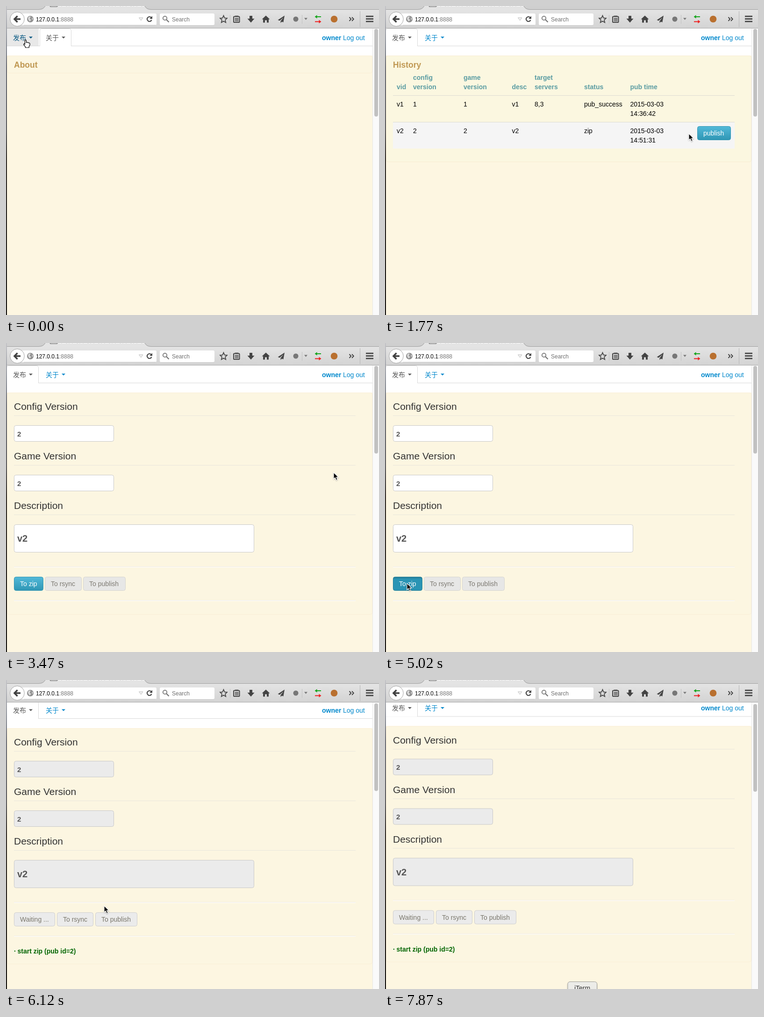
An HTML page for the animation above (8000 ms loop, 798 by 661 pixels).

```html
<!DOCTYPE html>
<html lang="en">
<head>
<meta charset="utf-8">
<title>Publish console</title>
<style>
html, body { margin: 0; width: 100%; height: 100%; overflow: hidden; background: #fff; }
svg { display: block; width: 798px; height: 661px; }
text { font: 14px "Liberation Sans", "Noto Sans CJK SC", Arial, sans-serif; white-space: pre; }
.b { font-weight: bold; }
.h3 { font-size: 21px; }
.h4 { font-size: 17.5px; font-weight: bold; }
.s { font-size: 12px; }
</style>
</head>
<body>
<svg viewBox="0 0 798 661">
  <defs>
    <linearGradient id="bar" x2="0" y2="1"><stop stop-color="#e4e4e4"/><stop offset="1" stop-color="#d3d3d3"/></linearGradient>
    <linearGradient id="info" x2="0" y2="1"><stop stop-color="#52b9d9"/><stop offset="1" stop-color="#2f96b4"/></linearGradient>
    <linearGradient id="pick" x2="0" y2="1"><stop stop-color="#0088cc"/><stop offset="1" stop-color="#0077b3"/></linearGradient>
    <linearGradient id="desk" x2="0" y2="1">
      <stop stop-color="#c4c4c8"/><stop offset=".12" stop-color="#8e929a"/><stop offset=".2" stop-color="#666a74"/>
      <stop offset=".4" stop-color="#55565a"/><stop offset=".5" stop-color="#2a2622"/><stop offset="1" stop-color="#0c0a08"/>
    </linearGradient>
    <filter id="drop" x="-10%" y="-10%" width="120%" height="140%"><feDropShadow dx="0" dy="4" stdDeviation="3.5" flood-opacity=".25"/></filter>
    <filter id="soft" x="-50%" y="-50%" width="200%" height="200%"><feDropShadow dx="0" dy="1" stdDeviation="1" flood-opacity=".35"/></filter>
    <clipPath id="view"><rect x="2" y="48" width="783" height="613"/></clipPath>
  </defs>

  <rect width="798" height="661" fill="#fff"/>
  <g clip-path="url(#view)"><g id="page"></g></g>

  <rect x="784" y="48" width="14" height="613" fill="#fafafa"/>
  <path d="M784.5 48V661" stroke="#e7e7e7"/>
  <rect id="thumb" x="788" y="49" width="8" height="187.5" rx="4" fill="#c1c1c1"/>

  <g id="chrome">
    <rect width="798" height="9" fill="#cfcfcf"/>
    <path d="M74 8Q81 7 84 0H297Q300 7 307 8Z" fill="#e4e4e4"/>
    <path d="M0 7.5H70Q80 7 84 0M297 0Q300 7 310 7.5H798" fill="none" stroke="#a0a0a0"/>
    <path d="M94.5 0V1.5H109.5V0" fill="#fff" stroke="#555"/>
    <path d="M113 .5H297" stroke="#fff" stroke-dasharray="5 2 8 3 3 2"/>
    <rect y="8" width="798" height="40" fill="url(#bar)"/>
    <path d="M0 47.5H798" stroke="#a9a9a9"/>
    <rect x="30" y="16" width="292" height="25" rx="3" fill="#fff"/>
    <path d="M38 41H320M331 41H445" stroke="#bbb" stroke-width=".8"/>
    <rect x="329" y="16" width="117" height="25" rx="3" fill="#fff"/>
    <circle cx="24" cy="28" r="15.3" fill="#fff" stroke="#a2a2a2"/>
    <path d="M31 28H19M24.5 21.5L18 28L24.5 34.5" fill="none" stroke="#404040" stroke-width="3.4"/>
    <circle cx="52" cy="28" r="7" fill="#8d8d8d"/>
    <path d="M47 25Q50 21 53 23L51 27L54 30L51 33Q47 31 47 25M55 24L58 27L56 31" fill="#d8d8d8"/>
    <text class="s" x="64" y="32.5">127.0.0.1<tspan x="114" fill="#777">:8888</tspan></text>
    <path d="M284.5 25H293L288.8 31Z" fill="#f4f4f4" stroke="#bdbdbd"/>
    <path d="M311.5 30A5 5 0 1 1 310.5 24.5" fill="none" stroke="#444" stroke-width="2.2"/>
    <path d="M313 21.5V27.5H307Z" fill="#444"/>
    <circle cx="340" cy="26" r="4.2" fill="none" stroke="#777" stroke-width="1.8"/>
    <path d="M343 29L348.5 34.5" stroke="#777" stroke-width="2.4"/>
    <text class="s" x="355" y="32.5" fill="#707070">Search</text>
    <path d="M465.5 20.5L467.7 25.6L473 26.1L469 29.8L470.2 35.2L465.5 32.4L460.8 35.2L462 29.8L458 26.1L463.3 25.6Z" fill="none" stroke="#444" stroke-width="1.7"/>
    <path d="M479.5 19V38M633.5 19V38" stroke="#c2c2c2"/>
    <path d="M757.5 11V45" stroke="#b5b5b5"/>
    <rect x="487" y="22.5" width="12.5" height="12.5" rx="1.5" fill="none" stroke="#444" stroke-width="2"/>
    <path d="M490 21.5H497M489.5 26.5H497.5M489.5 29H497.5M489.5 31.7H497.5" stroke="#444" stroke-width="1.6"/>
    <path d="M521 21H527V27H531.5L524 35.5L516.5 27H521Z" fill="#444"/>
    <path d="M556 20.5L564.5 28.5H562V35.5H558V30.5H554V35.5H550V28.5H547.5Z" fill="#444"/>
    <path d="M596 20.5L581.5 30L585.5 31.5L593.5 24.5L587.5 32.3V36.5L590 33.5L593.3 35Z" fill="#444"/>
    <circle cx="620" cy="28" r="5.5" fill="#777"/>
    <path d="M638 25.5H645L641.5 29.8Z" fill="#777"/>
    <path d="M660.5 23L665.5 19.3V22H674V24H665.5V26.7Z" fill="#15a51c"/>
    <path d="M674.5 33.5L669.5 29.8V32.5H661V34.5H669.5V37.2Z" fill="#ee2020"/>
    <circle cx="702" cy="28" r="7.3" fill="#b9702f"/>
    <path d="M734.5 24L738.3 28L734.5 32M740 24L743.8 28L740 32" fill="none" stroke="#444" stroke-width="1.9"/>
    <path d="M770 22.2H786M770 27.7H786M770 33.2H786" stroke="#444" stroke-width="2.7"/>
  </g>
  <rect width="2" height="661" fill="url(#desk)"/>

  <g id="label">
    <rect x="-31" y="645.5" width="62.5" height="30" rx="5" fill="#ecece8" stroke="#a0a09c" filter="url(#soft)"/>
    <text y="663.5" text-anchor="middle" fill="#333"></text>
  </g>
  <g id="cursor">
    <path id="arrow" d="M0 0V14L3.2 11L5.6 16.4L8.1 15.3L5.8 10.1H10.2Z" stroke="#fff" stroke-width="1.1" filter="url(#soft)"/>
    <path id="hand" d="M-1.6 10V1.5Q-.2-.7 1.3 1.5V6Q2.8 4.8 4 6.3Q5.6 5.5 6.6 7Q8.6 6.4 9 8.4V11.5L7.3 14.5V17H-.6V15.2L-4 11Q-4.8 8.6-2.9 8.8Z" fill="#fff" stroke="#000" stroke-width="1.2"/>
  </g>
</svg>
<script>
const LOOP = 8000;
const $ = id => document.getElementById(id);

// start, end, number of steps, target position
const moves = [
  [260, 860, 9, 46, 106],
  [1480, 1770, 4, 650, 273],
  [1866, 2250, 5, 701, 277],
  [3550, 4130, 8, 165, 278],
  [4190, 4660, 7, 47, 514],
  [5205, 5490, 4, 210, 483]
];
const hands = [[0, 50], [2400, 2450], [4580, 4660]];
const scrolls = [[0, 0], [6030, 1], [6120, 3], [6240, 6], [6350, 7.5]];
const labels = [
  [7130, 88, 'Tasks'], [7330, 33, 'Files'], [7510, 88, 'Tasks'], [7600, 150, 'Notes'],
  [7690, 235, 'Forms'], [7780, 330, 'Tools'], [7870, 422, 'iTerm']
];

const last = (list, t) => list.filter(e => e[0] <= t).pop();
const within = (p, x, y, w, h) => p[0] >= x && p[0] < x + w && p[1] >= y && p[1] < y + h;

function pointer(t) {
  let p = [42, 72];
  for (const [t0, t1, n, x, y] of moves) {
    if (t < t0) break;
    const k = Math.min(n, Math.floor((t - t0) / (t1 - t0) * (n - 1) + 1.001)) / n;
    p = [p[0] + (x - p[0]) * k, p[1] + (y - p[1]) * k];
  }
  return p;
}

const text = (x, y, s, fill = '#000', cls = '') =>
  `<text x="${x}" y="${y}" fill="${fill}" class="${cls}">${s}</text>`;
const rect = (x, y, w, h, fill, extra = '') =>
  `<rect x="${x}" y="${y}" width="${w}" height="${h}" fill="${fill}" ${extra}/>`;
const frame = (x, y, w, h, fill, line, r = 4) =>
  rect(x + .5, y + .5, w - 1, h - 1, fill, `rx="${r}" stroke="${line}"`);
const rule = (y, color) => rect(17, y, 731, 1, color);
const caret = (x, color) => `<path d="M${x - 4} 65.5h8l-4 4z" fill="${color}"/>`;

function button(x, y, w, s, look) {
  const [fill, line, ink] = {
    info: ['url(#info)', '#3496b3', '#fff'],
    hover: ['#2f96b4', '#2a86a1', '#fff'],
    down: ['#2a94b4', '#237c96', '#fff'],
    off: ['#e7e7e6', '#d6d5d0', '#7d7a72'],
    wait: ['#ebebeb', '#cfcfcf', '#7a776c']
  }[look];
  const shade = look === 'down' ? rect(x + 1, y + 1, w - 2, 3, '#000', 'opacity=".1"') : '';
  return frame(x, y, w, 30, fill, line) + shade + text(x + 13, y + 20, s, ink);
}

function nav(s) {
  let out = rect(2, 85, 782, 1, '#d9d9d9');
  const tab = (x, w) => `<path d="M${x + .5} 86V52.5q0-4 4-4h${w - 9}q4 0 4 4V86" fill="#fff" stroke="#d9d9d9"/>`;
  let ink = '#555', ink2 = '#0088cc';
  if (s.view === 'about') {
    out += rect(2, 48, 68, 37, s.menu ? '#999' : '#e8e8e8') + tab(72, 68);
    ink = s.menu ? '#fff' : '#005580';
    ink2 = '#555';
  } else out += tab(1, 69);
  return out + text(15, 72.5, '发布', ink) + caret(53, ink) +
    text(85, 72.5, '关于', ink2) + caret(123, ink2) +
    text(676, 72.5, 'owner', '#0088cc', 'b') + text(721, 72.5, 'Log out', '#0088cc');
}

const panel = h => frame(2, 106, 782, h, '#fcf6e1', '#faeed6');

function about(s) {
  let out = panel(38) + text(17, 132, 'About', '#c09853', 'h4');
  if (s.menu) {
    out += `<g filter="url(#drop)">${frame(2, 88, 162, 64, '#fff', '#c8c8c8', 5)}</g>`;
    if (s.item) out += rect(3, 94, 160, 26, 'url(#pick)');
    out += text(23, 112.5, '历史', s.item ? '#fff' : '#333') + text(23, 138.5, '发布', '#333');
  }
  return out;
}

function history(s) {
  const cols = [25, 60, 168, 271.5, 320, 426, 524.5];
  const heads = ['|vid', 'config|version', 'game|version', '|desc', 'target|servers', '|status', '|pub time'];
  const rows = [
    ['v1', '1', '1', 'v1', '8,3', 'pub_success', '2015-03-03|14:36:42'],
    ['v2', '2', '2', 'v2', '', 'zip', '2015-03-03|14:51:31']
  ];
  const line = (cells, y, ink, cls) => cells.map((c, i) =>
    c.split('|').map((w, j) => text(cols[i], y + j * 20, w, ink, cls)).join('')).join('');
  let out = frame(2, 106, 782, 228, '#fbf7e0', '#f7ecd2') + text(17, 132, 'History', '#c09853', 'h4');
  out += line(heads, 158, '#5a9ca2', 'b');
  rows.forEach((r, i) => {
    const y = 191 + i * 57;
    if (s.row === i) out += rect(17, y + 1, 731, 56, '#f5f5f5');
    out += rule(y, '#dddcd3') + line(r, y + 24, '#000', '');
  });
  return out + button(668, 257, 72, 'publish', s.btn);
}

function form(s) {
  const fill = s.wait ? '#ebebeb' : '#fff';
  let out = panel(s.wait ? 505 : 475);
  [['Config Version', 214, 35], ['Game Version', 214, 35], ['Description', 514, 60]].forEach(([name, w, h], i) => {
    const y = 106 * (i + 1);
    out += text(17, y + 37, name, '#333', 'h3') + rule(y + 49, '#e9e6dc') + frame(17, y + 70, w, h, fill, '#c9c9c9');
    out += i < 2 ? `<text x="24" y="${y + 93.5}" fill="#555" style="font-weight:bold;font-size:15px">2</text>`
      : `<text x="24" y="${y + 107}" fill="#555" style="font-weight:bold;font-size:20px">v2</text>`;
  });
  for (const y of [478, 550]) out += rule(y, '#efece5') + rule(y + 1, '#fff');
  out += s.wait
    ? button(17, 500, 88, 'Waiting ...', 'wait') + button(109, 500, 78, 'To rsync', 'wait') +
      button(191, 500, 90, 'To publish', 'wait') + text(17, 588, '·', '#006400', 'b') +
      text(24.5, 588, 'start zip (pub id=2)', '#006400', 'b')
    : button(17, 500, 63, 'To zip', s.btn) + button(83, 500, 79, 'To rsync', 'off') +
      button(165, 500, 91, 'To publish', 'off');
  return out;
}

const views = { about, history, form };

function stateAt(t, p) {
  if (t < 1160) return { view: 'about', menu: t >= 260, item: p[1] >= 94 };
  if (t < 3380) {
    const over = within(p, 668, 257, 72, 30);
    const row = within(p, 17, 192, 731, 56) ? 0 : within(p, 17, 249, 731, 56) ? 1 : -1;
    return { view: 'history', row, btn: t >= 2600 ? 'down' : over ? 'hover' : 'info' };
  }
  const over = within(p, 17, 500, 63, 30);
  return { view: 'form', wait: t >= 5110, btn: t >= 5020 ? 'down' : over ? 'hover' : 'info' };
}

const show = (el, on) => el.setAttribute('visibility', on ? 'inherit' : 'hidden');
let drawn = '';

function draw(t) {
  const p = pointer(t), s = stateAt(t, p), key = JSON.stringify(s);
  if (key !== drawn) {
    drawn = key;
    $('page').innerHTML = rect(2, 106, 782, 620, '#fdf6e1') + nav(s) + views[s.view](s);
  }
  const y = last(scrolls, t)[1];
  $('page').setAttribute('transform', `translate(0 ${-y})`);
  $('thumb').setAttribute('y', 49 + y / 3);

  const hand = hands.some(([a, b]) => t >= a && t < b);
  $('cursor').setAttribute('transform', `translate(${Math.round(p[0])} ${Math.round(p[1])})`);
  $('cursor').setAttribute('visibility', t < 6240 ? 'visible' : 'hidden');
  show($('hand'), hand);
  show($('arrow'), !hand);

  const tip = last(labels, t);
  $('label').setAttribute('visibility', tip ? 'visible' : 'hidden');
  if (tip) {
    $('label').setAttribute('transform', `translate(${tip[1]} 0)`);
    $('label').lastElementChild.textContent = tip[2];
  }
}

const start = performance.now();
function tick() {
  draw((performance.now() - start) % LOOP);
  requestAnimationFrame(tick);
}
tick();
</script>
</body>
</html>
```
